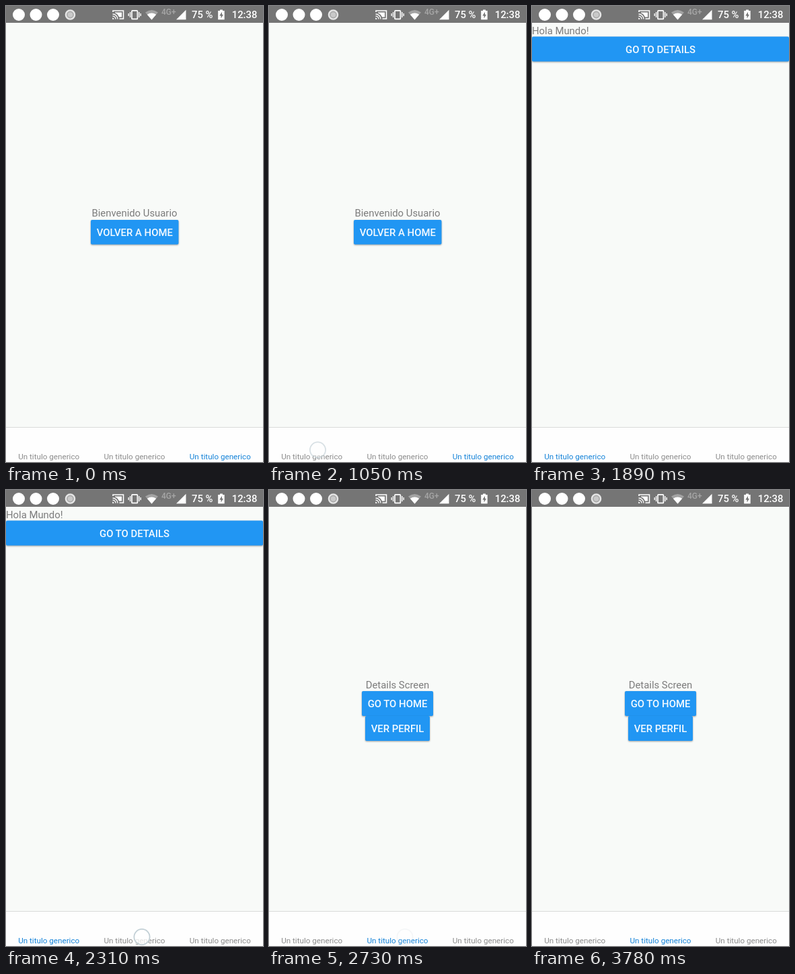
An HTML page for the animation above (6720 ms loop, 382x678 px).

```html
<!DOCTYPE html>
<html lang="es">
<head>
<meta charset="utf-8">
<title>Tabs</title>
<style>
  html, body { margin: 0; width: 100%; height: 100%; overflow: hidden; background: #f8faf8; }
  svg { display: block; width: 382px; height: 678px; font-family: Roboto, sans-serif; }
  .body { font-size: 14.86px; fill: #7c7c7c; }
  .btn rect { fill: #2196f3; filter: drop-shadow(0 1.5px 1.3px rgba(0, 0, 0, .36)); }
  .btn text { font-size: 14.86px; font-weight: 500; fill: #f4faff; }
  .mid, .btn text, .tab { text-anchor: middle; }
  .tab { font-size: 11.67px; fill: #8c8c8c; }
  .status text { font-size: 14.86px; font-weight: 500; }
  .screen, .tap { opacity: 0; }
</style>
</head>
<body>
<svg viewBox="0 0 382 678">
  <rect width="382" height="678" fill="#f8faf8"/>
  <g id="screens"></g>
  <g class="status" fill="#fff">
    <rect width="382" height="25" fill="#757575"/>
    <circle cx="19" cy="13" r="9"/>
    <circle cx="44.5" cy="13" r="9"/>
    <circle cx="70" cy="13" r="9"/>
    <circle cx="95.5" cy="13" r="6.6" fill="#a9a9a9" stroke="#e6e6e6" stroke-width="2.4"/>
    <circle cx="95.5" cy="13" r="3.8" fill="#c9c9c9"/>
    <!-- cast -->
    <path d="M159 9V7H174.5V19H168.5" fill="none" stroke="#fff" stroke-width="1.6"/>
    <path d="M162 9.5H172V16.5H168Q166 11.5 162 10.5Z"/>
    <path d="M158.5 12A7.5 7.5 0 0 1 166 19.5M158.5 15A4.5 4.5 0 0 1 163 19.5" fill="none" stroke="#fff" stroke-width="1.4"/>
    <path d="M158.2 17.5A2.4 2.4 0 0 1 160.6 19.8H158.2Z"/>
    <!-- vibrate -->
    <rect x="187" y="6.8" width="8.4" height="12.6" rx="1" fill="none" stroke="#fff" stroke-width="1.7"/>
    <path d="M184.6 9V17M182.2 11V15M197.8 9V17M200.2 11V15" fill="none" stroke="#fff" stroke-width="1.4"/>
    <!-- wifi -->
    <path d="M207 9.5Q216.5 2.5 226 9.5L216.5 20.5Z" fill="#a3a3a3"/>
    <path d="M209.8 12.7Q216.5 8.3 223.2 12.7L216.5 20.5Z"/>
    <text x="231" y="13" style="font-size:12px" fill="#a6a6a6">4G+</text>
    <path d="M267.5 5.8V20.3H253Z"/>
    <text x="276" y="18.3">75 %</text>
    <path d="M318 5.5H322V7H324.7V20.3H315.2V7H318Z"/>
    <path d="M321 8.8L317.3 14.4H319.6V18.4L323 12.8H321Z" fill="#757575"/>
    <text x="335.7" y="18.3">12:38</text>
  </g>
  <rect y="626" width="382" height="52" fill="#fefefe"/>
  <rect y="626" width="382" height="1" fill="#d9dbda"/>
  <g id="tabs"></g>
  <g id="taps"></g>
</svg>
<script>
const LOOP = 6720, GREY = '#8c8c8c', BLUE = '#1583d8';

function add(parent, tag, attrs, text = '') {
  const el = document.createElementNS('http://www.w3.org/2000/svg', tag);
  for (const k in attrs) el.setAttribute(k, attrs[k]);
  el.textContent = text;
  return parent.appendChild(el);
}

// steps: [time in ms, value], each value held until the next
function hold(el, prop, steps) {
  const frames = steps.map(([t, v]) => ({ offset: t / LOOP, [prop]: v, easing: 'step-end' }));
  frames.push({ offset: 1, [prop]: steps[steps.length - 1][1] });
  el.animate(frames, { duration: LOOP, iterations: Infinity });
}

function span(from, to, on, off) {
  const steps = from ? [[0, off], [from, on]] : [[0, on]];
  if (to < LOOP) steps.push([to, off]);
  return steps;
}

function button(g, x, y, w, h, label) {
  const b = add(g, 'g', { class: 'btn' });
  add(b, 'rect', { x, y, width: w, height: h, rx: 2 });
  add(b, 'text', { x: x + w / 2, y: y + 24.3 }, label);
}

const [screens, tabs, taps] = ['screens', 'tabs', 'taps'].map(id => document.getElementById(id));

const views = [
  { tab: 2, from: 0, to: 1260, draw(g) {
    add(g, 'text', { class: 'body mid', x: 191, y: 313.3 }, 'Bienvenido Usuario');
    button(g, 126, 318, 130.5, 36.5, 'VOLVER A HOME');
  } },
  { tab: 0, from: 1260, to: 2520, draw(g) {
    add(g, 'text', { class: 'body', x: 0, y: 41.5 }, 'Hola Mundo!');
    button(g, 0, 45.5, 382, 37, 'GO TO DETAILS');
  } },
  { tab: 1, from: 2520, to: LOOP, draw(g) {
    add(g, 'text', { class: 'body mid', x: 191, y: 294.5 }, 'Details Screen');
    button(g, 138, 299, 106, 37, 'GO TO HOME');
    button(g, 143, 336, 96, 37, 'VER PERFIL');
  } },
];

for (const v of views) {
  const g = add(screens, 'g', { class: 'screen' });
  v.draw(g);
  hold(g, 'opacity', span(v.from, v.to, 1, 0));
  const label = add(tabs, 'text', { class: 'tab', x: 63.7 + 127.3 * v.tab, y: 673.5 }, 'Un titulo generico');
  hold(label, 'fill', span(v.from, v.to, BLUE, GREY));
}

function tap(x, y, steps) {
  const c = add(taps, 'circle', { class: 'tap', cx: x, cy: y, r: 11.6,
    fill: '#fff', 'fill-opacity': .75, stroke: '#c3d0d6', 'stroke-width': 1.8 });
  hold(c, 'opacity', [[0, 0], ...steps]);
}

tap(72.5, 660, [[840, .9], [1050, .65], [1260, .25], [1470, 0]]);
tap(202, 664.5, [[2310, 1], [2520, .5], [2730, .15], [2940, 0]]);
</script>
</body>
</html>
```
